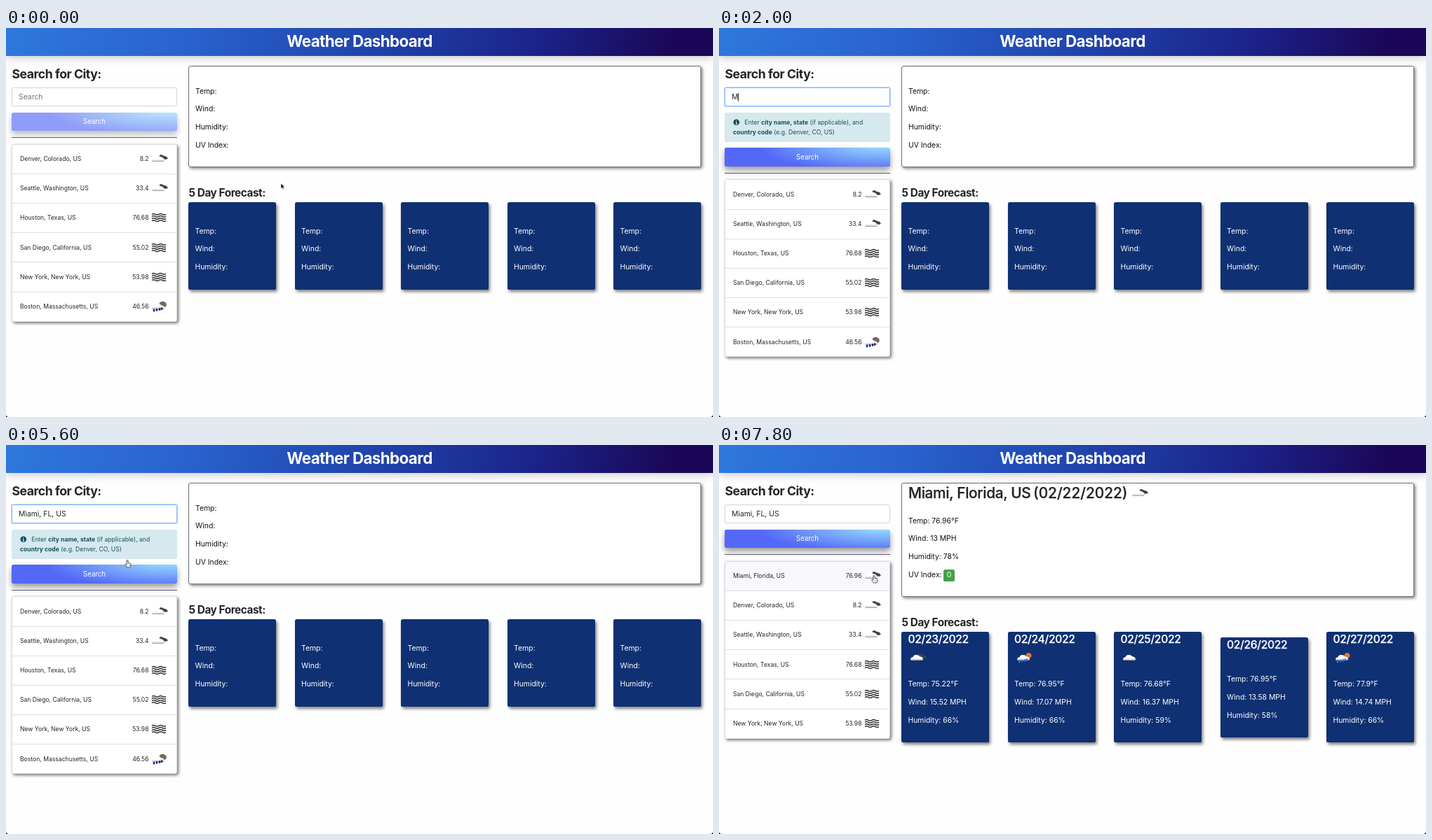
Write an HTML page that moves like this. It is 1008x556 px and loops after 8000 ms.

```html
<!DOCTYPE html>
<html lang="en">
<head>
<meta charset="utf-8">
<title>Weather Dashboard</title>
<style>
html, body { margin: 0; width: 100%; height: 100%; overflow: hidden; background: #000; }
#stage {
  position: relative; width: 1008px; height: 556px; overflow: hidden;
  background: #fefefe; border-radius: 0 0 4px 4px; color: #212529;
  font: 10.4px Inter, "Open Sans", sans-serif; font-optical-sizing: none;
}
#stage div, #stage svg { position: absolute; box-sizing: border-box; }
.t { line-height: 0; white-space: pre; }
.small { font-size: 8.6px; }
.right { transform: translateX(-100%); }
.center { transform: translateX(-50%); }
.head { font-weight: 700; letter-spacing: -.028em; }
.title { font-size: 22.4px; color: #fff; }
.search-title { font-size: 17.7px; }
.forecast-title { font-size: 15.3px; }
.city { font-size: 20.8px; font-weight: 500; letter-spacing: -.015em; }
.today { font-size: 20.8px; font-weight: 500; }
.date { font-size: 15.6px; font-weight: 500; letter-spacing: -.02em; }
.city, .today, .date { -webkit-text-stroke: .25px; }
.white { color: #fff; }
.black { color: #111; }
.muted { color: #6c757d; }
.info { color: #17505f; }
.label { font-size: 9.7px; color: #fff; }
.header {
  background: linear-gradient(100deg, #2e78dc, #2a63cf 25%, #2046ae 50%, #1b2389 75%, #1b0757 94%);
  box-shadow: 0 3px 12px rgba(0, 0, 0, .2);
}
.input { background: #fff; border: 1px solid #d0d4d9; border-radius: 2.6px; }
.input.active { border-color: #c3d0ee; }
.input.focus { border-color: #86b7fe; box-shadow: 0 0 0 1px rgba(120, 172, 250, .5); }
.alert { background: #d5e9ee; border-radius: 2.6px; }
.button {
  background: radial-gradient(ellipse 75% 135% at 95% -10%, #98e0fe, #5468f8);
  border-radius: 2.6px; box-shadow: 0 5px 9px rgba(0, 0, 0, .4);
}
.dim { opacity: .65; }
.rule { background: #5b566c; }
.list { background: #fff; border: 1px solid #ddd; border-radius: 3px; box-shadow: 2px 2px 4px rgba(0, 0, 0, .55); }
.row { border-bottom: 1px solid #dfdfdf; }
.row.last { border: 0; }
.row.hover { background: #f7f8fc; }
.menu { background: #fff; border: 1px solid #c9c9c9; }
.panel { background: #fff; border: 1px solid #6f7276; border-radius: 3px; box-shadow: 2px 2px 4px rgba(0, 0, 0, .5); }
.card { background: #0f3072; border-radius: 2.6px; box-shadow: 2px 3px 4px rgba(0, 0, 0, .5); }
.badge { background: #45a04a; border-radius: 2.6px; }
.caret { position: absolute; top: -6px; width: 1px; height: 12px; background: #333; }
</style>
</head>
<body>
<div id="stage"></div>
<script>
const LOOP = 8000, STEP = 200;
const stage = document.getElementById('stage');

const text = (x, y, str, cls = '') =>
  `<div class="t ${cls}" style="left:${x}px;top:${y}px">${str}</div>`;
const box = (x, y, w, h, cls) =>
  `<div class="${cls}" style="left:${x}px;top:${y}px;width:${w}px;height:${h}px"></div>`;
const svg = (x, y, w, h, body) =>
  `<svg style="left:${x}px;top:${y}px" width="${w}" height="${h}">${body}</svg>`;
const shape = (d, fill, extra = '') => `<path d="${d}" fill="${fill}" ${extra}/>`;
const stroke = (d, color, width) => shape(d, 'none', `stroke="${color}" stroke-width="${width}"`);

const DEFS = svg(0, 0, 0, 0, `<linearGradient id="cloud" x2="0" y2="1">
  <stop offset=".5" stop-color="#fff"/><stop offset=".8" stop-color="#ddd"/>
  <stop offset="1" stop-color="#888"/></linearGradient>`);

const CLOUD = shape('M1 11.5q0-2.8 3.5-3.2 1.500-4 5.500-3 3-.6 4 2 4.500.3 5 4 0 1.700-2 1.700H3q-2 0-2-1.500z', 'url(#cloud)');
const drops = color => [4, 8, 12, 15].map((x, i) =>
  shape(`M${x} ${12 - i * .8}q3 4 0 4.500-3-.5 0-4.500z`, color)).join('');
const waves = [4.3, 7.4, 10.5, 13.6].map(y =>
  stroke(`M1 ${y}q2.500-1.600 5 0t5 0 5 0 5 0`, '#333', 1.5)).join('');

const ICONS = {
  broken: shape('M11 5.500q2-3.500 4.500-2 2 .2 2.500 1.500 3-.5 4.500 1.500 1.500 1.500 1 2.500-1 .8-3 .8h-2q-1.500-3-4-3.500z', '#444') + CLOUD,
  cloud: CLOUD,
  mist: waves,
  rain: shape('M11 6q2-5 7-4 5 2 3.500 6-2 3-6 3z', '#79655a') + CLOUD + drops('#14208a'),
  sunRain: '<circle cx="17.5" cy="6" r="3.2" fill="#f0642d" stroke="#f5a04a" stroke-width="2" stroke-dasharray="1.3 1.2"/>'
    + CLOUD + drops('#3b63d8'),
};
const icon = (kind, x, y) => svg(x, y - 9, 24, 18, ICONS[kind]);

const cities = [
  ['Denver, Colorado, US', '8.2', 'broken'],
  ['Seattle, Washington, US', '33.4', 'broken'],
  ['Houston, Texas, US', '76.68', 'mist'],
  ['San Diego, California, US', '55.02', 'mist'],
  ['New York, New York, US', '53.98', 'mist'],
  ['Boston, Massachusetts, US', '46.56', 'rain'],
];
const found = ['Miami, Florida, US', '76.96', 'broken'];
const suggestions = ['Miami', 'North Miami', 'South Miami', 'Tamiami', 'West Miami'];
const forecast = [
  ['75.22', '15.52', 66, 'broken'],
  ['76.95', '17.07', 66, 'sunRain'],
  ['76.68', '16.37', 59, 'cloud'],
  ['76.95', '13.58', 58, ''],
  ['77.9', '14.74', 66, 'sunRain'],
];

// [step, value]: each value holds until the next step.
const typing = [[0, ''], [10, 'M'], [11, 'Mi'], [12, 'Mia'], [13, 'Miam'], [14, 'Miami'],
  [16, 'Miami,'], [17, 'Miami, F'], [26, 'Miami, FL, US']];
const valueAt = (table, n) => table.filter(row => row[0] <= n).pop()[1];

// [step, x, y] of the pointer tip.
const path = [[0, 392, 222], [5, 199, 94], [19, 199, 94], [25, 180, 113.5], [26, 180, 116],
  [29, 170, 182], [30, 170, 182], [33, 178, 138], [34, 178, 138], [35, 212, 182], [39, 220.5, 186.5]];

function pointerAt(n) {
  const k = Math.max(1, path.findIndex(p => p[0] >= n));
  const [a, b] = [path[k - 1], path[k]];
  const u = (n - a[0]) / (b[0] - a[0]), e = u * u * (3 - 2 * u);
  return { x: a[1] + (b[1] - a[1]) * e, y: a[2] + (b[2] - a[2]) * e };
}

function pointer({ x, y }) {
  const inside = x > 8 && x < 244;
  if (inside && y > 85 && y < 112) {
    return svg(x - 3, y - 5, 6, 10,
      stroke('M1 .7q2 0 2 1.3 0-1.3 2-1.3M3 2v6M1 9.3q2 0 2-1.3 0 1.3 2 1.3', '#333', .9));
  }
  if (inside && y >= 112) {
    return svg(x - 4, y - .5, 11, 13,
      shape('M3 7V1.5q0-1 1-1t1 1v3l3 .7q1 .3 1 1.3l-.5 3q-.3 1.5-1.5 1.5H4.5q-1 0-1.5-1L.8 7.3q-.2-1 .7-1 .8 0 1.5.7z',
        '#fff', 'stroke="#222" stroke-width=".8"') + stroke('M5 7v2M7 7v2', '#555', .5));
  }
  return svg(x - 1, y - 1, 8, 12,
    shape('M1 1v7.6l1.7-1.6 1.3 2.8 1.2-.5L4 6.5h2.4z', '#111', 'stroke="#fff" stroke-width=".5"'));
}

function searchBox(n) {
  const value = valueAt(typing, n), focused = n >= 5 && n < 30;
  const caretOn = focused && ![8, 15, 21, 22, 23, 25, 28].includes(n);
  const caret = caretOn ? '<i class="caret"></i>' : '';
  const state = !focused ? '' : n === 5 ? 'active' : 'focus';
  return box(8, 84.5, 236, 27, `input ${state}`)
    + (value ? text(18, 98.5, value + caret) : text(18, 98.5, caret + 'Search', 'muted'));
}

const alertBox = () => box(8, 121, 236, 41.5, 'alert')
  + svg(20, 130, 10, 10, '<circle cx="4.8" cy="4.8" r="4.3" fill="#0c4a5c"/>'
    + stroke('M4.8 2v1.4M4 4.6h1v2.7M3.7 7.3h2.4', '#fff', 1))
  + text(36.5, 135, 'Enter <b>city name, state</b> (if applicable), and', 'small info')
  + text(20, 148.5, '<b>country code</b> (e.g. Denver, CO, US)', 'small info');

const menu = () => box(8, 112, 236, 85, 'menu')
  + suggestions.map((name, i) => text(12.5, 120.5 + i * 16.9, `${name}, FL, US`, 'small black')).join('');

function cityList(rows, top, mouse) {
  const pitch = 42.2;
  return box(8, top, 236, 254, 'list') + rows.map(([name, temp, kind], i) => {
    const y = top + i * pitch, mid = y + 21.2;
    const hover = mouse && mouse.x < 243 && mouse.x > 9 && mouse.y > y && mouse.y < y + pitch;
    return box(9, y + 1, 234, pitch, `row ${hover ? 'hover' : ''} ${i === 5 ? 'last' : ''}`)
      + text(20, mid, name, 'small') + text(203.5, mid, temp, 'small right') + icon(kind, 206.5, mid);
  }).join('');
}

const lines = (x, y, rows, cls) => rows.map((row, i) => text(x, y + i * 25.9, row, cls)).join('');

function current(done) {
  const rows = done
    ? ['Temp: 76.96°F', 'Wind: 13 MPH', 'Humidity: 78%', 'UV Index:']
    : ['Temp:', 'Wind:', 'Humidity:', 'UV Index:'];
  return box(260, 54, 731, done ? 163 : 145, 'panel')
    + lines(270, done ? 108.5 : 90.5, rows, 'black')
    + (done ? text(270, 69, 'Miami, Florida, US', 'city') + text(448, 69, '(02/22/2022)', 'today')
      + icon('broken', 587.5, 69) + box(320, 177.5, 16, 17, 'badge') + text(328, 186, '0', 'white center') : '');
}

function card(day, i, done) {
  const x = 260 + i * 151.5, left = x + 9.5;
  if (!done) {
    return box(x, 249.4, 125, 124.3, 'card')
      + lines(left, 290.5, ['Temp:', 'Wind:', 'Humidity:'], 'white');
  }
  const [temp, wind, humidity, kind] = day;
  const top = kind ? 267.4 : 275;
  return box(x, top, 125, kind ? 157.5 : 142.5, 'card')
    + text(left, top + 10.5, `02/${23 + i}/2022`, 'date white')
    + (kind ? icon(kind, left + 2.5, top + 36.5) : '')
    + lines(left, top + (kind ? 74.5 : 60),
      [`Temp: ${temp}°F`, `Wind: ${wind} MPH`, `Humidity: ${humidity}%`], 'white');
}

function view(n) {
  const hint = n >= 6 && n < 30, done = n >= 37;
  const shift = hint ? 50.7 : 0;
  const mouse = n >= 10 && n < 19 ? null : pointerAt(n);
  const rows = done ? [found, ...cities.slice(0, 5)] : cities;
  return DEFS
    + box(0, 0, 1008, 40, 'header') + text(504, 18.5, 'Weather Dashboard', 'head title center')
    + text(8.5, 65.5, 'Search for City:', 'head search-title')
    + searchBox(n)
    + (hint ? alertBox() : '')
    + box(8, 120.7 + shift, 236, 26.8, `button ${n < 10 ? 'dim' : ''}`)
    + text(126, 134 + shift, 'Search', 'label center')
    + box(8, 156 + shift, 236, 1, 'rule')
    + cityList(rows, 165.7 + shift, mouse)
    + (n >= 19 && n < 26 ? menu() : '')
    + current(done)
    + text(260.5, done ? 254 : 236, '5 Day Forecast:', 'head forecast-title')
    + forecast.map((day, i) => card(day, i, done)).join('')
    + (mouse ? pointer(mouse) : '');
}

const start = performance.now();
let shown = -1;
function frame() {
  const n = Math.floor((performance.now() - start) % LOOP / STEP);
  if (n !== shown) stage.innerHTML = view(shown = n);
  requestAnimationFrame(frame);
}
frame();
</script>
</body>
</html>
```
